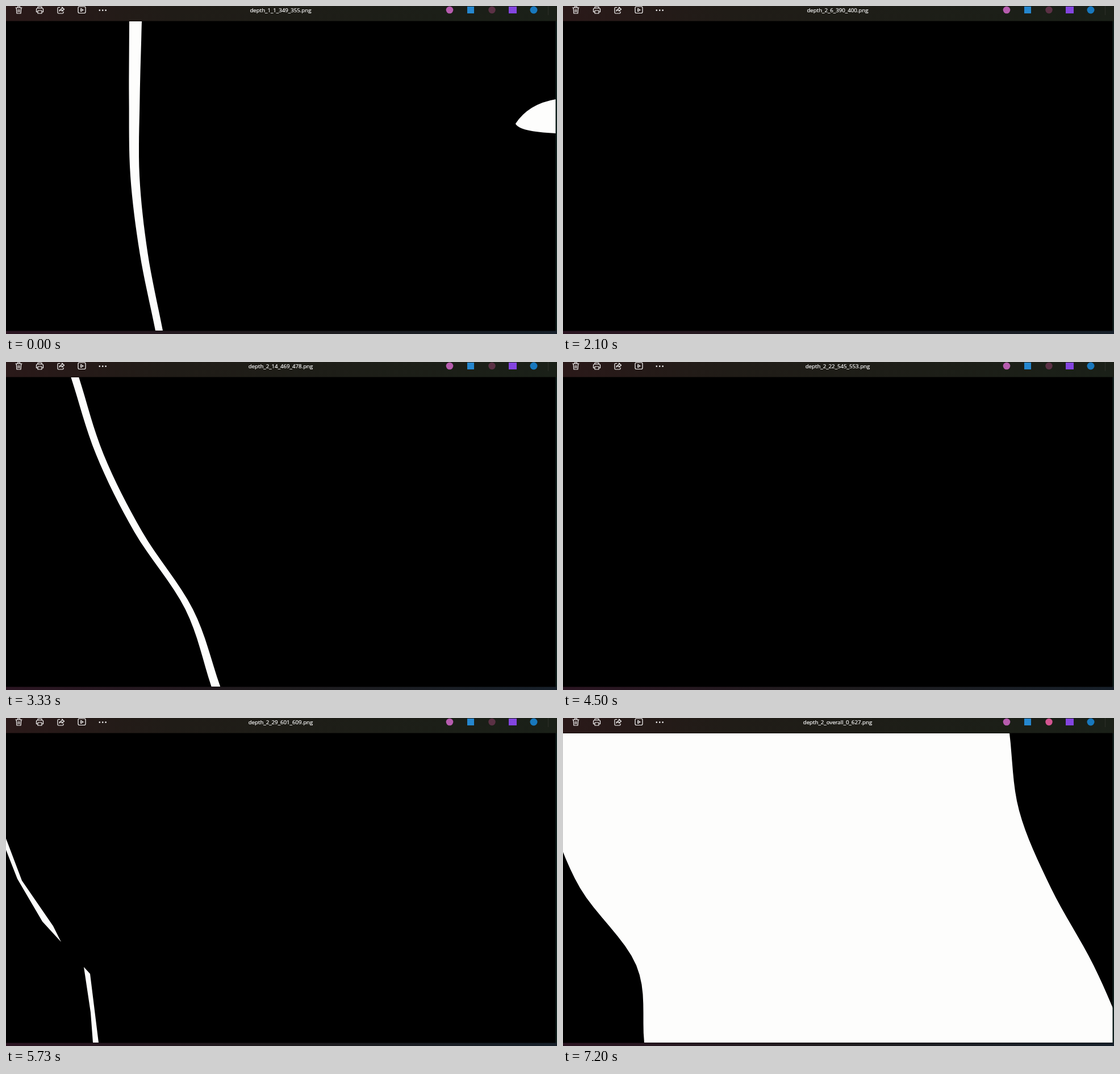
An HTML page for the animation above (7.23 s loop, 970x577 px).

```html
<!DOCTYPE html>
<html lang="en">
<head>
<meta charset="utf-8">
<title>Depth slices</title>
<style>
  html, body { margin: 0; width: 100%; height: 100%; overflow: hidden; background: #1c1c1a; }
  svg { display: block; width: 970px; height: 577px; }
  text { font: 9.7px "Open Sans", "Noto Sans", sans-serif; fill: #fff; stroke: #fff; stroke-width: .2; text-anchor: middle; }
  .line { fill: none; stroke: #fff; stroke-width: 1.2; stroke-linecap: round; stroke-linejoin: round; }
</style>
</head>
<body>
<svg viewBox="0 0 970 577">
  <defs>
    <linearGradient id="bar">
      <stop offset="0" stop-color="#2a1919"/>
      <stop offset=".3" stop-color="#201c17"/>
      <stop offset="1" stop-color="#1a2018"/>
    </linearGradient>
    <linearGradient id="foot">
      <stop offset="0" stop-color="#2b1522"/>
      <stop offset=".5" stop-color="#1f1c1e"/>
      <stop offset="1" stop-color="#17202a"/>
    </linearGradient>
    <clipPath id="view"><rect y="27" width="967.5" height="544.5"/></clipPath>
  </defs>
  <rect width="970" height="27" fill="url(#bar)"/>
  <rect x="967" y="27" width="3" height="545" fill="#10211f"/>
  <rect y="571" width="970" height="6" fill="url(#foot)"/>
  <rect y="26.5" width="967.5" height="545"/>
  <path id="mask" fill="#fdfdfc" clip-path="url(#view)"/>

  <g class="line">
    <path d="M17 3H28M20.5 3V1H24.5V3M18.2 3L19 13H26L26.8 3M21.3 6V10.5M23.7 6V10.5"/>
    <path d="M56 4V1.5H63V4M56 10.5H53.5V5.5Q53.5 4 55 4H64Q65.5 4 65.5 5.5V10.5H63M56 8H63V13H56Z"/>
    <path d="M95 2.5H92.5Q91 2.5 91 4V11.5Q91 13 92.5 13H99.5Q101 13 101 11.5V10M94 9Q94.5 5 98.5 5V2L102.5 5.7L98.5 9V7Q95.5 7 94 9Z"/>
    <rect x="127" y="1" width="13" height="11.5" rx="2.2"/>
    <path d="M131.8 4.5V9.5L136 7Z"/>
    <path d="M164.8 7.5H176" stroke-width="2.7" stroke-dasharray="0 5.4"/>
  </g>
  <text id="name" x="483.5" y="11"></text>

  <circle cx="781" cy="7" r="6.3" fill="#b65cae"/>
  <rect x="812" y="1" width="12" height="12" fill="#2587cf"/>
  <circle id="tool" cx="855.5" cy="7" r="6.2"/>
  <rect x="885" y="1" width="14" height="12" fill="#8445e0"/>
  <circle cx="929" cy="7" r="6.5" fill="#1878bd"/>
  <path d="M954.5 0V16" stroke="#2c2f29"/>
</svg>

<script>
const LOOP = 7230, SETTLED = 6600, TOP = 27, HEIGHT = 544, STEPS = 32;

// Piecewise linear value at v, for pairs [key, value]
function along(pairs, v) {
  let i = 1;
  while (i < pairs.length - 1 && v > pairs[i][0]) i++;
  const [a, p] = pairs[i - 1], [b, q] = pairs[i];
  return p + (q - p) * (v - a) / (b - a);
}

// Smooth edge x(u), u from 0 at the top to 1, through evenly spaced key points
function edge(...xs) {
  const n = xs.length - 1;
  const key = i => i < 0 ? 2 * xs[0] - xs[1] : i > n ? 2 * xs[n] - xs[n - 1] : xs[i];
  return u => {
    const i = Math.min(n - 1, Math.floor(u * n)), f = u * n - i;
    const [a, b, c, d] = [-1, 0, 1, 2].map(k => key(i + k));
    return b + f / 2 * (c - a + f * (2 * a - 5 * b + 4 * c - d + f * (3 * (b - c) + d - a)));
  };
}
const mix = (a, b, t) => u => a(u) + (b(u) - a(u)) * t;
const trace = x => Array.from({ length: STEPS + 1 }, (_, i) =>
  `${x(i / STEPS).toFixed(1)},${TOP + HEIGHT * i / STEPS}`);
const band = (a, b, t0 = 0, t1 = 1) =>
  'M' + [...trace(mix(a, b, t0)), ...trace(mix(a, b, t1)).reverse()].join('L') + 'Z';

// First surface: a core strip that widens to both sides
const coreL = edge(217, 216.5, 219, 235.5, 263);
const coreR = edge(239, 235.5, 235, 249.5, 276);
const outerL = edge(157, 157, 83, 114, 254);
const outerR = edge(260, 249, 246, 263, 293);
const blob = 'M968 164Q920 172 897 207Q903 221 968 224Z';
const bulge = 'M157,27L155,85L160,206L145,205L111,184L90,211L76,260L95,345L116,443L150,504L230,510L254,571L';

// Second surface: two ridges and the far left border
const leftA = edge(170, 212, 282, 369, 424);
const leftB = edge(249, 312, 341, 399, 445);
const rightA = edge(722, 766, 831, 906, 961);
const rim = edge(786, 803, 859, 934, 994);
const rightB = u => rim(u) - 20 * Math.max(0, 1 - 5 * u);
const farL = edge(-80, -28, 30, 129, 143);
const sliver = 'M0 212L28 286L83 366L97 394L64 358L20 283L0 232ZM137 438L148 450L163 571H153L149 518Z';

function firstMask(n) {
  if (n === 1) return band(coreL, coreR) + blob;
  const t0 = (n - 2) / 5, t1 = (n - 1) / 5;
  return band(coreL, outerL, t0, t1) + band(coreR, outerR, t0, t1);
}

// The gap between the ridges fills outwards, then a band moves left
function secondMask(n) {
  if (n > 6 && n < 10) {
    const t0 = (n - 7) / 6, t1 = (n - 6) / 6;
    return band(leftB, rightA, .5 - t1, .5 - t0) + band(leftB, rightA, .5 + t0, .5 + t1);
  }
  if (n === 10) return band(leftA, leftB) + band(rightA, rightB);
  if (n > 10 && n < 18 || n > 24 && n < 29)
    return band(leftA, farL, (n - 11) / 18, (n - 10) / 18);
  return n === 29 ? sliver : '';
}

const slides = [];
function addSurface(id, count, depth, mask, overall) {
  const at = n => Math.round(along(depth, n));
  for (let n = 1; n <= count; n++)
    slides.push({ name: `depth_${id}_${n}_${at(n)}_${at(n + 1)}.png`, d: mask(n) });
  slides.push({ name: `depth_${id}_overall_0_${at(count + 1)}.png`, d: overall });
}
addSurface(1, 6, [[1, 349], [2, 355], [7, 397]], firstMask,
  bulge + trace(outerR).reverse().join('L') + 'Z' + blob);
addSurface(2, 31, [[1, 344], [6, 390], [10, 428], [11, 440], [22, 545], [30, 609], [32, 627]],
  secondMask, band(farL, rim));

// Browsing pace: time in ms, slide position
const pace = [[0, -1], [2570, 16.05], [5730, 35.9]];
const $ = id => document.getElementById(id);
const mask = $('mask'), label = $('name'), tool = $('tool');
let shown = -1;

function draw(now) {
  const t = now % LOOP;
  const i = Math.max(0, Math.min(slides.length - 1, Math.floor(along(pace, t))));
  if (i !== shown) {
    shown = i;
    mask.setAttribute('d', slides[i].d);
    label.textContent = slides[i].name;
  }
  tool.setAttribute('fill', t >= SETTLED ? '#d45591' : '#5b3145');
}

const start = performance.now();
function tick() {
  draw(performance.now() - start);
  requestAnimationFrame(tick);
}
tick();
</script>
</body>
</html>
```
